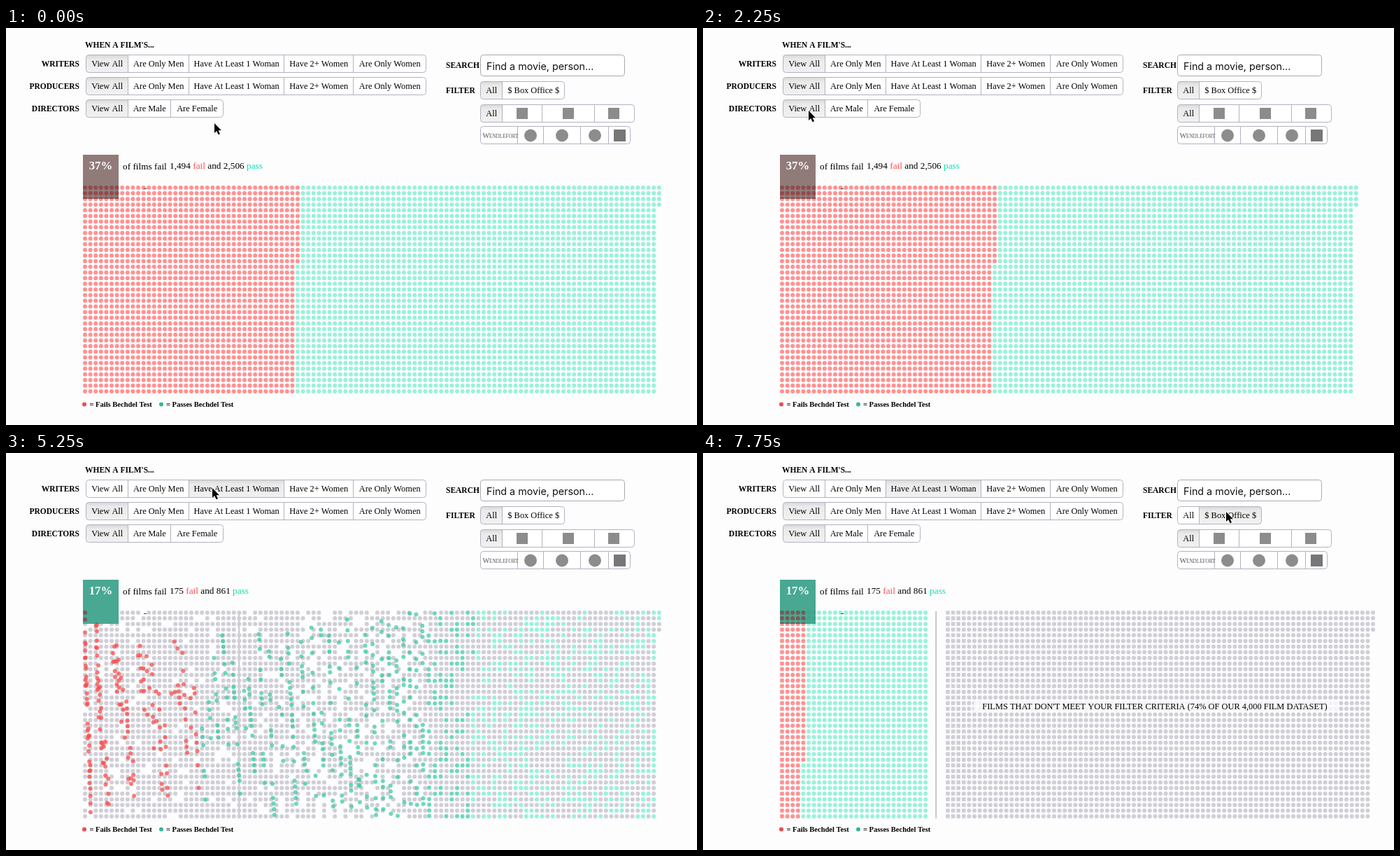
An HTML page with a canvas for the animation above (8 s loop, 988 px wide and 567 px high).

```html
<!DOCTYPE html>
<html lang="en">
<head>
<meta charset="utf-8">
<title>Film dataset explorer</title>
<style>
html, body { margin: 0; width: 100%; height: 100%; overflow: hidden; background: #fdfdfe; }
canvas { display: block; }
</style>
</head>
<body>
<canvas id="stage" width="988" height="567"></canvas>
<script>
const ctx = document.getElementById('stage').getContext('2d');
const SERIF = '"Liberation Serif", "Times New Roman", serif';
const BG = '#fdfdfe';
const LOOP = 8000, FILTERED = 4250, MOVE = 4895, SETTLED = 6000, BOX_OFFICE = 7750;
const ROWS = 37, TOTAL = 4000, FAILS = 1494, FAILS_LEFT = 175, PASSES_LEFT = 861;

// ---------- drawing helpers ----------
function text(s, x, y, size = 12.4, color = '#000', weight = 400, align = 'left') {
  ctx.font = `${weight} ${size}px ${SERIF}`;
  ctx.textAlign = align;
  ctx.fillStyle = color;
  ctx.fillText(s, x, y);
  return x + ctx.measureText(s).width;
}
function box(x, y, w, h, r, fill, stroke) {
  ctx.beginPath();
  ctx.roundRect(x, y, w, h, r);
  if (fill) { ctx.fillStyle = fill; ctx.fill(); }
  if (stroke) { ctx.strokeStyle = stroke; ctx.lineWidth = 1; ctx.stroke(); }
}
function disc(x, y, r, color) {
  ctx.beginPath();
  ctx.arc(x, y, r, 0, 7);
  ctx.fillStyle = color;
  ctx.fill();
}

// ---------- buttons ----------
function group(edges, y, labels, chosen, size) {
  const x0 = edges[0] + .5, end = edges[edges.length - 1] + .5;
  box(x0, y + .5, end - x0, 25, 4, '#fff');
  ctx.save();
  ctx.clip();
  const shade = ctx.createLinearGradient(0, y, 0, y + 26);
  shade.addColorStop(0, '#d6d6d6');
  shade.addColorStop(.25, '#eaeaea');
  shade.addColorStop(1, '#f1f1f1');
  ctx.fillStyle = shade;
  if (chosen >= 0) ctx.fillRect(edges[chosen], y, edges[chosen + 1] - edges[chosen], 26);
  ctx.restore();
  box(x0, y + .5, end - x0, 25, 4, null, '#b4b2c0');
  edges.slice(1, -1).forEach(x => {
    ctx.beginPath();
    ctx.moveTo(x + .5, y + .5);
    ctx.lineTo(x + .5, y + 25.5);
    ctx.stroke();
  });
  labels.forEach((s, i) =>
    text(s, (edges[i] + edges[i + 1]) / 2 + .7, y + 17, size, '#000', 400, 'center'));
}

function controls(t) {
  const label = (s, x, y, align) => text(s, x, y, 11.5, '#000', 700, align);
  const people = ['View All', 'Are Only Men', 'Have At Least 1 Woman', 'Have 2+ Women', 'Are Only Women'];
  const edges = [114, 174, 261, 397, 496, 600];
  label("WHEN A FILM'S...", 113, 27.5);
  label('WRITERS', 105, 54.5, 'right');
  label('PRODUCERS', 105, 86.5, 'right');
  label('DIRECTORS', 105, 119, 'right');
  group(edges, 38, people, t < FILTERED ? 0 : 2);
  group(edges, 70, people, 0);
  group([114, 174, 235, 310], 102, ['View All', 'Are Male', 'Are Female'], 0);

  label('SEARCH', 629, 57);
  label('FILTER', 629, 93);
  box(678.5, 38.5, 206, 30, 4, '#fff', '#a9a9b0');
  ctx.font = '14.3px Inter, sans-serif';
  ctx.textAlign = 'left';
  ctx.fillStyle = '#111';
  ctx.fillText('Find a movie, person...', 687, 60);
  group([678, 709, 798], 76, ['All', '$ Box Office $'], t < BOX_OFFICE ? 0 : 1);
  group([678, 709, 766, 841, 898], 109, ['All'], 0);
  group([678, 731, 768, 821, 861, 892], 140, [], -1);
  text('W', 681.5, 156.5, 10.5, '#555');
  text('ENDLEFORT', 691, 156.5, 7.2, '#555');
  [738, 804, 869].forEach(x => box(x - 8, 114, 16, 16, 0, '#8c8c8c'));
  [750, 795, 842].forEach(x => disc(x, 153.5, 9, '#8c8c8c'));
  box(869, 145, 17, 17, 0, '#777');
}

// ---------- dots ----------
let seed = 11;
const random = () => (seed = seed * 16807 % 2147483647) / 2147483647;
const cell = (i, x0) => [x0 + Math.floor(i / ROWS) * 7.6, 228 + i % ROWS * 8.08];
const dots = [];
let kept = 0, dropped = 0;
for (let i = 0; i < TOTAL; i++) {
  const fail = i < FAILS;
  const quota = fail ? FAILS_LEFT : FAILS_LEFT + PASSES_LEFT;
  const keep = random() < (quota - kept) / ((fail ? FAILS : TOTAL) - i);
  const rank = keep ? kept++ : dropped++;
  dots.push({ fail, keep, rank, from: cell(i, 113), to: cell(rank, keep ? 113 : 350) });
}
const ease = p => p < .5 ? 4 * p ** 3 : 1 - 4 * (1 - p) ** 3;

function drawDot(d, t, tint) {
  let p = d.keep ? (t - MOVE - d.rank * .6) / 500 : +(t >= SETTLED);
  p = t >= SETTLED ? 1 : Math.max(0, Math.min(1, p));
  const moving = d.keep && p > 0 && p < .97;
  const e = ease(p);
  const x = d.from[0] + (d.to[0] - d.from[0]) * e;
  const y = d.from[1] + (d.to[1] - d.from[1]) * e;
  if (tint) {
    if (x < 165 && y < 250 && (d.keep || t < FILTERED))
      disc(x, y, 3, d.fail ? 'rgba(150,40,45,.6)' : 'rgba(40,165,130,.4)');
    return;
  }
  ctx.fillStyle = !d.keep && t >= FILTERED ? '#d0ced6'
    : d.fail ? (moving ? 'rgba(250,75,75,.75)' : '#ff9292')
    : (moving ? 'rgba(50,200,160,.7)' : '#99f2da');
  const square = t >= BOX_OFFICE && d.rank < (d.keep ? 37 : 148);
  ctx.beginPath();
  if (square) ctx.roundRect(x - 2.8, y - 2.8, 5.6, 5.6, 1);
  else ctx.arc(x, y, 3, 0, 7);
  ctx.fill();
}

function chart(t) {
  const filtered = t >= FILTERED;
  if (filtered) {
    ctx.fillStyle = '#c2c0ca';
    ctx.fillRect(332.3, 226, 1.8, 296);
  }
  dots.forEach(d => d.keep || drawDot(d, t));
  dots.forEach(d => d.keep && drawDot(d, t));

  ctx.save();
  ctx.beginPath();
  ctx.rect(110, 181, 51, 63);
  ctx.clip();
  ctx.fillStyle = filtered ? '#48a892' : '#907b79';
  ctx.fillRect(110, 181, 51, 63);
  dots.forEach(d => drawDot(d, t, true));
  ctx.restore();

  text(filtered ? '17%' : '37%', 135.5, 202, 16.8, '#fff', 700, 'center');
  text('of films fail', 167, 201.5, 13.3);
  let x = text(filtered ? '175 ' : '1,494 ', 234, 200.5, 13.3);
  x = text('fail ', x, 200.5, 13.3, '#ff4a4a');
  x = text(filtered ? 'and 861 ' : 'and 2,506 ', x, 200.5, 13.3);
  text('pass', x, 200.5, 13.3, '#16dcae');
  ctx.fillStyle = '#444';
  ctx.fillRect(197, 229, 4, 1);

  disc(112, 537.5, 3, '#ea4c54');
  text('= Fails Bechdel Test', 119.5, 540.5, 10.5, '#000', 700);
  disc(222, 537.5, 3, '#35b79b');
  text('= Passes Bechdel Test', 229, 540.5, 10.5, '#000', 700);

  if (t >= SETTLED) {
    box(387, 353, 521, 17, 2, 'rgba(253,253,254,.8)');
    text("FILMS THAT DON'T MEET YOUR FILTER CRITERIA (74% OF OUR 4,000 FILM DATASET)",
      646, 366, 12.4, '#000', 400, 'center');
  }
}

// ---------- film card: a star marks a male name ----------
const cards = [
  { at: 1500, x: 144, y: 346, h: 151, dot: 324.9, title: 'Small Arguments With Tedious Owls',
    crew: ['*Alan Dremovich,*Peter Lowell Granger',
      '*Colin Bernard Tessler,Ida Marovner,*Alan Dremovich,Noor Selavide,*Simon Orlick', '*Alan Dremovich'] },
  { at: 1750, x: 149, y: 311, h: 163, dot: 292.6, title: 'The Lantern Keeper of Varrow Hill',
    crew: ['*Martin Dellowby',
      '*Owen Harlisse,*Martin Dellowby,Clara Venning,*Hugh Tarrell,*Leon Bravick,*Ned Morlay', '*Owen Harlisse'] },
  { at: 2000, x: 150, y: 288, h: 146, dot: 268.4, title: 'Brass Monday and the Long Harbour',
    crew: ['*Victor Aldenay,*Ross Pellimore', '*Glen Farradine,*Ross Pellimore,Tessa Quorle', '*Victor Aldenay'] },
];

function card(c) {
  const coral = '#ff6b6b';
  disc(151, c.dot, 4, '#000');
  ctx.save();
  ctx.translate(c.x, c.y);
  ctx.shadowColor = 'rgba(0,0,0,.4)';
  ctx.shadowBlur = 6;
  ctx.shadowOffsetY = 1;
  box(0, 0, 418, 151 + c.h - 151, 5, '#fff');
  ctx.shadowColor = 'transparent';
  box(14.5, 10.5, 70, 114, 0, '#fff', '#777');
  text(c.title, 99, 25.5, 16.6);
  ctx.strokeStyle = coral;
  ctx.lineWidth = 1.6;
  ctx.beginPath();
  ctx.moveTo(392, 15);
  ctx.lineTo(358, 15);
  ctx.arc(358, 22, 7, -Math.PI / 2, Math.PI / 2, true);
  ctx.lineTo(392, 29);
  ctx.moveTo(99, 36);
  ctx.lineTo(130, 36);
  ctx.arc(130, 43, 7, -Math.PI / 2, Math.PI / 2);
  ctx.lineTo(99, 50);
  ctx.stroke();
  text('FAILS', 364, 25.5, 9.8, coral, 700);
  text('TEST', 99, 46.5, 9.8, coral, 700);
  ['WRITERS', 'PRODUCERS', 'DIRECTORS'].forEach((head, i) => {
    const x = [114, 219, 329][i];
    ctx.letterSpacing = '.7px';
    text(head, x, 76, 11.4);
    ctx.letterSpacing = '0px';
    c.crew[i].split(',').forEach((name, k) => {
      const y = 92 + k * 12.3;
      text(name.replace('*', ''), x, y, 9.8, '#000', 700);
      if (name[0] === '*') {
        ctx.font = 'bold 12px "DejaVu Sans", sans-serif';
        ctx.fillStyle = '#8c94f2';
        ctx.fillText('♂', x - 14, y + 1);
      }
    });
  });
  ctx.restore();
}

// ---------- pointer: time, x, y ----------
const stops = [
  [0, 298, 136], [500, -50, 0], [1250, 173, 307], [1500, 148, 329], [1750, 153, 294], [2000, 154, 271],
  [2250, 151, 118], [2500, 187, 101], [2750, 217, 73], [3000, 249, 52], [3250, 243, 51], [3500, 244, 53],
  [3750, 295, 50], [6500, 354, 59], [6750, 576, 142], [7000, 702, 107], [7250, 745, 82], [7500, 748, 84],
];
const arrow = new Path2D('M0 0V14L3.2 11 5.6 16.2 8 15.2 5.7 10.2H10Z');
function pointer(t) {
  const [, x, y] = stops.filter(s => s[0] <= t).pop();
  ctx.save();
  ctx.translate(x, y);
  ctx.strokeStyle = '#fff';
  ctx.lineWidth = 1.6;
  ctx.stroke(arrow);
  ctx.fillStyle = '#000';
  ctx.fill(arrow);
  ctx.restore();
}

function frame(now) {
  const t = Math.floor((now % LOOP) / 250 + 1e-6) * 250;
  ctx.fillStyle = BG;
  ctx.fillRect(0, 0, 988, 567);
  controls(t);
  chart(t);
  const open = cards.find(c => t >= c.at && t < c.at + 250);
  if (open) card(open);
  pointer(t);
  requestAnimationFrame(frame);
}
requestAnimationFrame(frame);
</script>
</body>
</html>
```
